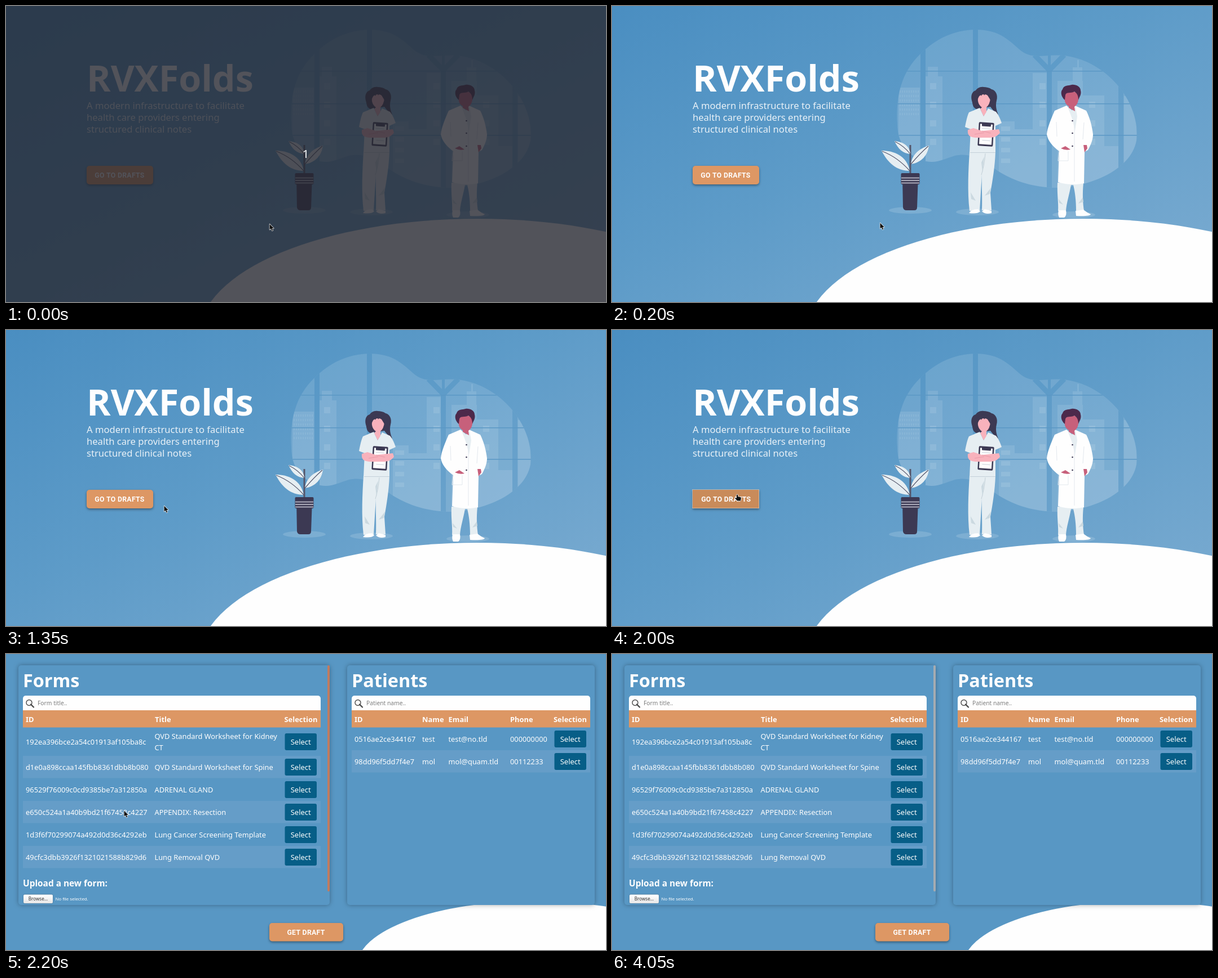
Animation of 1064x526 px, one loop 4.15 s. Source, as an HTML page with a canvas:

```html
<!DOCTYPE html>
<html lang="en">
<head>
<meta charset="utf-8">
<title>Drafts</title>
<style>
  html, body { margin: 0; width: 100%; height: 100%; overflow: hidden; background: #5897c4; }
  canvas { display: block; }
</style>
</head>
<body>
<canvas id="stage" width="1064" height="526"></canvas>
<script>
const W = 1064, H = 526, LOOP = 4150;
const ctx = document.getElementById('stage').getContext('2d');
const SANS = '"Noto Sans", sans-serif', ROBOTO = 'Roboto, sans-serif';
const WHITE = '#fefefe', BLUE = '#5897c4', ORANGE = '#dd9764', DARK = '#3c3953',
      PALE = '#e6eef2', PINK = '#f8b2bc', SKIN = '#c7607b';

// ---------- helpers ----------
function text(str, x, y, size, { weight = 400, color = WHITE, font = SANS, align = 'left', spacing = 0 } = {}) {
  ctx.font = `${weight} ${size}px ${font}`;
  ctx.letterSpacing = spacing + 'px';
  ctx.textAlign = align;
  ctx.fillStyle = color;
  ctx.fillText(str, x, y);
}

function rect(x, y, w, h, color, radius = 0) {
  ctx.fillStyle = color;
  ctx.beginPath();
  ctx.roundRect(x, y, w, h, radius);
  ctx.fill();
}

function shape(d, color) {
  ctx.fillStyle = color;
  ctx.fill(new Path2D(d));
}

function line(d, color, width = 1) {
  ctx.strokeStyle = color;
  ctx.lineWidth = width;
  ctx.stroke(new Path2D(d));
}

function ellipse(x, y, rx, ry, color) {
  ctx.fillStyle = color;
  ctx.beginPath();
  ctx.ellipse(x, y, rx, ry, 0, 0, Math.PI * 2);
  ctx.fill();
}

function withShadow(color, blur, dy, draw) {
  ctx.save();
  ctx.shadowColor = color;
  ctx.shadowBlur = blur;
  ctx.shadowOffsetY = dy;
  draw();
  ctx.restore();
}

function button(x, y, w, h, label, color = ORANGE, radius = 5, shift = 0) {
  withShadow('rgba(0,0,0,.4)', 4, 2, () => rect(x, y, w, h, color, radius));
  text(label, x + w / 2 - 0.5 + shift, y + 20.5, 12.25,
    { weight: 600, font: ROBOTO, align: 'center', spacing: 0.3 });
}

// ---------- landing page ----------
const BLOB = new Path2D('M645 42 C690 42 706 64 726 80 C748 96 770 85 800 88 C870 95 931 160 931 228 ' +
  'C931 285 855 323 780 323 C738 320 710 309 684 293 C655 272 635 260 608 266 ' +
  'C588 272 576 280 557 276 C524 268 506 243 506 210 C503 160 513 118 547 85 C575 58 605 43 645 42Z');

function windowView(sky) {
  const glass = 'rgba(255,255,255,.1)';
  ctx.save();
  ctx.clip(BLOB);
  rect(500, 40, 440, 290, 'rgba(255,255,255,.12)');

  const buildings = [[508, 145, 38, 130], [553, 125, 33, 155], [560, 108, 18, 17], [686, 205, 28, 120],
    [714, 219, 32, 110], [746, 119, 25, 205], [790, 133, 45, 195], [817, 109, 17, 24], [825, 96, 3, 13],
    [835, 159, 38, 170], [873, 249, 25, 70], [908, 160, 22, 130]];
  for (const b of buildings) rect(...b, glass);
  for (let i = 0; i < 4; i++) {
    const y = 137 + i * 33;
    for (const x of [564, 758, 846]) if (x < 800 || i) rect(x, y, 11, 11, glass);
    rect(690, 214 + i * 19, 16, 8, glass);
  }
  for (let y = 150; y < 195; y += 8)
    for (let x = 510; x < 545; x += 4) rect(x, y, 2, 4, 'rgba(255,255,255,.07)');

  for (const x of [547, 640, 898]) rect(x, 40, 9, 290, sky);
  rect(771, 112, 9, 215, sky);
  line('M749 87 L775.5 114 L802 87', sky, 9);
  line('M775.5 84 V114', sky, 5);
  for (const y of [115, 173, 229]) rect(500, y, 440, 1.5, '#5b98c5');
  ctx.restore();
}

function plant() {
  line('M529 247 V300', '#55566b', 3);
  const leaves = ['M478 257 C500 257 523 266 528 293 C505 293 489 279 478 257Z',
    'M501 240 C515 241 528 248 529 263 C516 262 507 254 501 240Z',
    'M562 248 C560 264 550 278 530 281 C532 264 545 253 562 248Z'];
  for (const d of leaves) shape(d, PALE);
  line('M479 258 Q507 269 528 293 M502 241 Q518 249 529 263 M561 249 Q546 262 530 281', '#55566b', 1.2);
  shape('M515 302 H543 L541 358 Q541 363 536 363 H522 Q517 363 516 358Z', DARK);
  rect(512.5, 297, 33, 20, DARK, 2);
  for (const y of [304.5, 309, 313.5]) rect(513, y, 32, 2, '#aaa9b8');
}

function nurse() {
  shape('M659 144 C652 143 647 147 645 150 C638 152 636 160 638 168 C640 174 639 180 646 183 L671 179 ' +
    'C675 184 679 190 685 193 C681 184 680 176 682 168 C685 158 680 149 673 148 C669 145 664 144 659 144Z', DARK);
  shape('M652 181 L659 196 L667 182 L681 188 C686 194 689 202 691 208 L680 213 L680 261 H634 L636 219 L626 215 ' +
    'C628 205 630 195 633 189Z', PALE);
  shape('M649 164 C651 159 655 157 660 157 C665 157 669 160 671 164 Q670 175 664 180 L664 188 L659 196 L653 183 ' +
    'L656 180 C651 177 648 170 649 164Z', PINK);
  shape('M648 167 L653 155 L655 160 L658 154 L660 159 L663 154 L671 167 L671 153 L657 150 L648 156Z', DARK);
  shape('M634 259 H680 C679 285 675 310 671 332 L673 363 H656 C657 340 655 315 656 298 L652 364 H634 ' +
    'C630 330 632 290 634 259Z', PALE);
  line('M635 260.5 H680 M662 262 Q660 285 655 300', '#c3d0d8', 1);
  shape('M636 331 L645 346 L637 343Z M672 323 L661 337 L670 334Z M655 278 L660 268 L657 296Z', '#cbd9e0');
  shape('M633 368 Q637 361 649 361 L653 365 Q648 370 633 368Z M656 365 L661 361 L673 364 V368 Q662 371 656 365Z', WHITE);

  ctx.save();
  ctx.translate(663, 228);
  ctx.rotate(0.06);
  rect(-13.5, -21, 27, 42, DARK, 2);
  rect(-11, -18, 22, 36, WHITE);
  rect(-8, -20, 16, 6, DARK, 1);
  line('M-8 -10 H7 M-6 11 H8', '#d9dee4', 1.5);
  ctx.restore();

  shape('M631 220 L641 217 L656 222 L686 219 L688 225 C684 232 676 234 668 234 H645 C634 233 630 230 631 220Z', PINK);
  line('M656 222 L672 226 M643 228 L660 225', '#e99aa8', 1);
}

function doctor() {
  shape('M790 314 H836 C834 335 835 350 837 364 H823 C823 345 821 330 818 318 H814 C811 335 806 350 805 364 H791 ' +
    'C792 350 789 335 790 314Z', PALE);
  shape('M792 343 L800 353 L793 350Z M835 340 L827 351 L836 348Z', '#cbd9e0');
  shape('M792 363 L805 363 Q807 372 802 376 H793 Q790 370 792 363Z M822 364 L836 362 Q842 367 849 370 Q848 374 823 373Z', WHITE);
  shape('M806 177 L785 186 C779 200 772 216 771 228 C773 240 782 249 789 255 L793 258 L791 313 ' +
    'C805 318 825 318 837 315 L838 259 L844 256 C850 245 853 236 853 228 C851 212 847 198 841 186 ' +
    'L821 177 L816 186Z', WHITE);
  shape('M808 179 L816 186 L822 179 L825 196 L821 222 L817 203Z', PALE);
  line('M793 258 L791 275 H809 V258 M788 206 L789 232 M837 207 L835 237 M820 203 V312', '#e3e8ee', 1);
  shape('M803 160 C804 150 826 150 827 158 C828 168 826 175 820 179 L821 187 L810 181 V178 C803 174 802 168 803 160Z', SKIN);
  shape('M803 167 C796 161 795 152 799 148 C801 140 810 142 815 140 C822 139 831 143 831 150 ' +
    'C833 157 829 161 827 167 C827 160 825 155 820 152 C813 156 806 152 804 158Z', '#4c294b');
  shape('M796 253 L804 249 L813 255 Q804 257 796 253Z M836 247 L842 247 L843 253 L838 260Z', SKIN);
  for (const y of [204, 226, 249]) ellipse(816.5, y, 1.3, 1.3, DARK);
}

function landing(hover, focus) {
  const sky = ctx.createLinearGradient(0, 0, 418, 845);
  sky.addColorStop(0, '#4a8ec1');
  sky.addColorStop(0.45, '#5d9bc8');
  sky.addColorStop(1, '#7cacd1');
  ctx.fillStyle = sky;
  ctx.fillRect(0, 0, W, H);

  windowView(sky);
  for (const [x, y] of [[529, 363], [648, 366], [819, 371]]) ellipse(x, y, 38, 6, 'rgba(255,255,255,.14)');
  ellipse(836, 584, 493, 206, WHITE);
  plant();
  nurse();
  doctor();

  text('RVXFolds', 143, 152, 64.6, { weight: 700 });
  ['A modern infrastructure to facilitate', 'health care providers entering', 'structured clinical notes']
    .forEach((s, i) => text(s, 143, 182.5 + i * 21, 16.6, { color: '#e9f1f7' }));

  button(143, 284, 118, 33, 'GO TO DRAFTS', hover ? '#c98b5a' : ORANGE, focus ? 0 : 5, focus ? 0.8 : 0);
  if (focus) {
    ctx.strokeStyle = 'rgba(235,225,215,.5)';
    ctx.lineWidth = 1;
    ctx.strokeRect(142.5, 283.5, 118, 33);
  }
}

// ---------- drafts page ----------
function searchIcon(x, y) {
  ctx.lineCap = 'round';
  line(`M${x + 9} ${y + 9} L${x + 14} ${y + 14}`, '#4a4a4a', 2.4);
  ctx.lineCap = 'butt';
  ctx.beginPath();
  ctx.arc(x + 6, y + 6, 5, 0, Math.PI * 2);
  ctx.lineWidth = 1.4;
  ctx.stroke();
}

function panel(x, w, h, tableWidth, title, hint, columns) {
  withShadow('rgba(0,0,0,.32)', 8, 0, () => rect(x, 20, w, h, BLUE, 5));
  const left = x + 8;
  text(title, left, 59, 32.4, { weight: 700 });
  rect(left, 74, tableWidth, 27, WHITE, [5, 5, 0, 0]);
  rect(left, 100, tableWidth, 30.5, ORANGE);
  searchIcon(left + 5, 80.5);
  text(hint, left + 26, 91, 10.3, { color: '#7d7d7d' });
  for (const [label, cx] of columns) text(label, cx, 121, 12.9, { weight: 700 });
}

function upload(x, y) {
  text('Upload a new form:', x, y, 15.4, { weight: 700 });
  const face = ctx.createLinearGradient(0, y + 15, 0, y + 31);
  face.addColorStop(0, '#ffffff');
  face.addColorStop(1, '#e6e6e6');
  withShadow('rgba(0,0,0,.4)', 2, 0, () => rect(x + 1, y + 15, 52, 15.5, face, 2));
  text('Browse…', x + 27, y + 25.5, 8.1, { color: '#333', align: 'center' });
  text('No file selected.', x + 57.5, y + 25.5, 7.8);
}

function selectButton(x, cy) {
  rect(x, cy - 15, 56.5, 30, '#075e87', 3);
  text('Select', x + 28.2, cy + 4.8, 13, { align: 'center' });
}

const cell = (str, x, cy) => text(str, x, cy + 4.8, 12.8);
const stripe = (x, cy, w) => rect(x, cy - 20, w, 39.5, '#659dc8');

function emptyTables() {
  rect(0, 0, W, H, BLUE);
  ellipse(945, 555, 315, 116, WHITE);
  panel(285, 221, 208, 205, 'Forms', 'Form title..', [['ID', 298], ['Title', 335], ['Selection', 396]]);
  upload(293, 162);
  rect(293, 205, 54, 13, ORANGE, 3);
  text('Submit', 320, 214.7, 8.7, { weight: 700, align: 'center' });
  panel(537, 251, 208, 235, 'Patients', 'Patient name..',
    [['ID', 550], ['Name', 574], ['Email', 621], ['Phone', 666], ['Selection', 716]]);
  button(471, 260, 131, 32, 'GET DRAFT');
}

const FORMS = [
  ['192ea396bce2a54c01913af105ba8c', 'QVD Standard Worksheet for Kidney'],
  ['d1e0a898ccaa145fbb8361dbb8b080', 'QVD Standard Worksheet for Spine'],
  ['96529f76009c0cd9385be7a312850a', 'ADRENAL GLAND'],
  ['e650c524a1a40b9bd21f67458c4227', 'APPENDIX: Resection'],
  ['1d3f6f70299074a492d0d36c4292eb', 'Lung Cancer Screening Template'],
  ['49cfc3dbb3926f1321021588b829d6', 'Lung Removal QVD'],
];
const PATIENTS = [
  ['0516ae2ce344167', 'test', 'test@no.tld', '000000000'],
  ['98dd96f5dd7f4e7', 'mol', 'mol@quam.tld', '00112233'],
];

function filledTables(barColor) {
  rect(0, 0, W, H, BLUE);
  ellipse(937, 555, 315, 116, WHITE);

  panel(22, 552, 426, 528, 'Forms', 'Form title..', [['ID', 35], ['Title', 264], ['Selection', 493.5]]);
  FORMS.forEach(([id, title], i) => {
    const cy = i ? 161 + i * 40 : 156;
    if (i % 2) stripe(30, cy, 528);
    cell(id, 35, cy);
    cell(title, 263.5, i ? cy : 146);
    selectButton(494.5, cy);
  });
  cell('CT', 263.5, 166);
  upload(30, 412.5);
  rect(570, 20, 4, 402, barColor, 2);

  const columns = [['ID', 618], ['Name', 738], ['Email', 784.5], ['Phone', 894], ['Selection', 971]];
  panel(605, 439, 426, 423, 'Patients', 'Patient name..', columns);
  PATIENTS.forEach((row, i) => {
    const cy = 151 + i * 40;
    if (i % 2) stripe(613, cy, 423);
    row.forEach((value, c) => cell(value, columns[c][1], cy));
    selectButton(972.5, cy);
  });
  button(467, 478, 131, 32.5, 'GET DRAFT');
}

// ---------- pointer ----------
const ARROW = new Path2D('M.5 .5 V10.6 L2.9 8.5 L4.7 12.4 L6.3 11.7 L4.6 8 H7.8Z');
const HAND = new Path2D('M0 1.2 Q1.2 -.4 2.2 1.2 V4 L7 5 Q8 5.4 7.8 7 L7 11.5 H1.2 L-2.6 7.4 Q-3 5.8 -1.4 6 L0 7Z');

function pointer([x, y], hand) {
  const path = hand ? HAND : ARROW;
  ctx.save();
  ctx.translate(hand ? x + 1 : x, y);
  ctx.lineJoin = 'round';
  ctx.lineWidth = 1.5;
  ctx.strokeStyle = 'rgba(255,255,255,.85)';
  ctx.stroke(path);
  ctx.fillStyle = '#111';
  ctx.fill(path);
  ctx.restore();
}

// Eased move seen in `count` discrete steps, the last one landing at `end`.
function glide(t, start, end, count, from, to) {
  const step = Math.floor((t - start) / (end - start) * (count - 1) + 1e-6) + 1;
  const p = Math.min(step / count, 1);
  const e = p * p * (3 - 2 * p);
  return from.map((v, i) => Math.round(v + (to[i] - v) * e));
}

function pointerAt(t) {
  const onButton = [220, 292];
  if (t < 100) return [467, 387];
  if (t < 200) return [472, 386];
  if (t < 900) return [475, 385];
  if (t < 1050) return [453, 368];
  if (t < 2050) return glide(t, 1050, 1450, 6, [453, 368], onButton);
  if (t < 2200) return onButton;
  if (t < 2850) return glide(t, 2200, 2700, 7, onButton, [17, 38]);
  return null;
}

// ---------- timeline ----------
function render(t) {
  const pos = pointerAt(t);
  const hover = t < 2050 && pos[0] < 261 && pos[1] < 317;
  if (t < 2050) landing(hover, t >= 2000);
  else if (t < 2200) emptyTables();
  else filledTables(t < 4050 ? '#c07b60' : '#a5abb1');

  if (t < 50) {
    rect(0, 0, W, H, 'rgba(36,38,46,.79)');
    text('1', 531.5, 270, 20, { align: 'center' });
  }
  if (pos) pointer(pos, hover);
}

const begin = performance.now();
function tick() {
  render((performance.now() - begin) % LOOP);
  requestAnimationFrame(tick);
}
tick();
</script>
</body>
</html>
```
